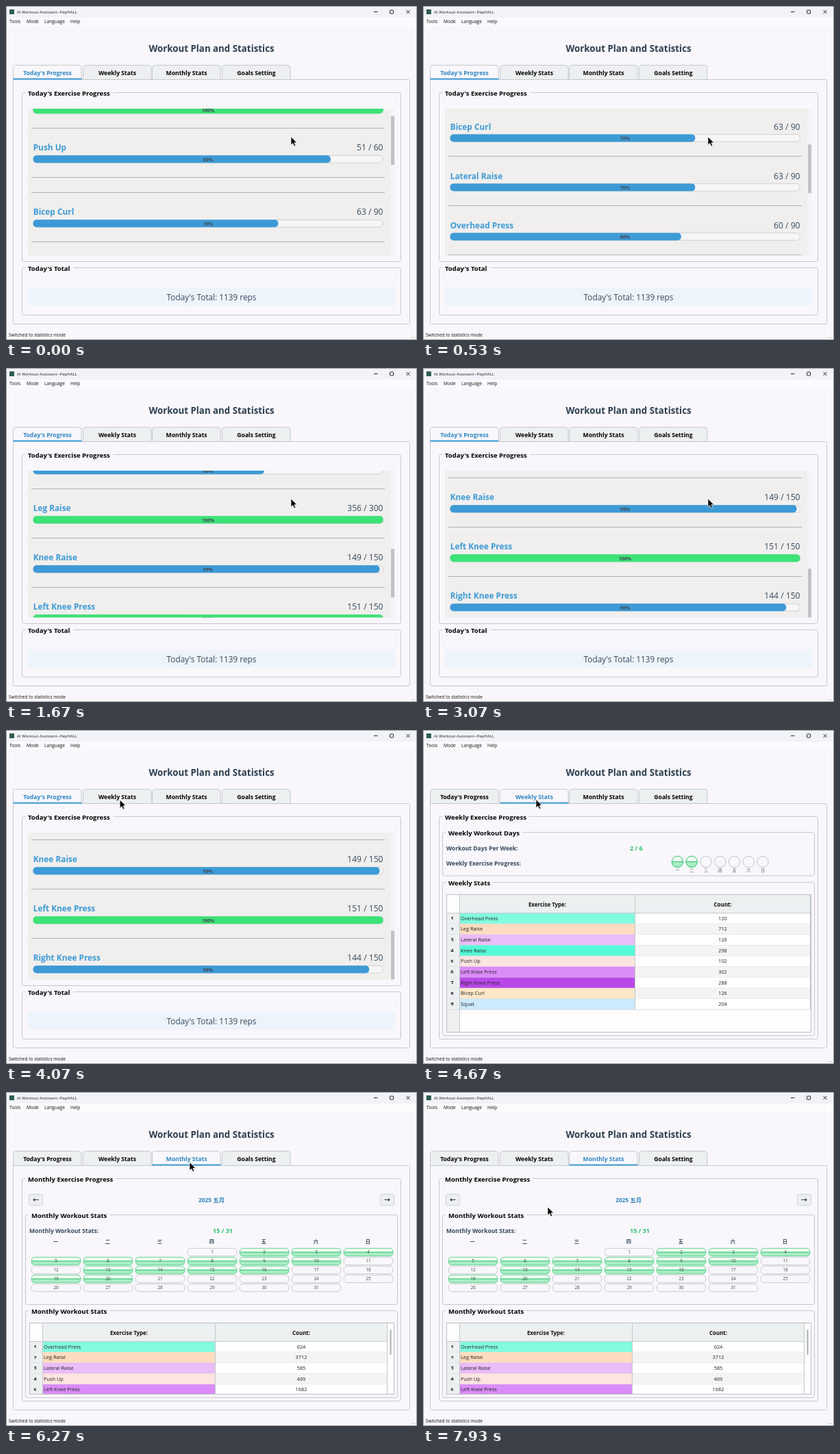
An HTML page that plays this animation: 600x488 px, repeating every 8 s.

```html
<!DOCTYPE html>
<html lang="en">
<head>
<meta charset="utf-8">
<title>Workout statistics</title>
<style>
  html, body { margin: 0; width: 100%; height: 100%; overflow: hidden; background: #f9f7fb; }
  svg { display: block; }
  text { font-family: "Open Sans", "Noto Sans", "Noto Sans CJK SC", "Noto Sans CJK", sans-serif; white-space: pre; }
  .b { font-weight: 700; }
  .mid { text-anchor: middle; }
  .end { text-anchor: end; }
</style>
</head>
<body>
<svg id="stage" width="600" height="488" viewBox="0 0 600 488"></svg>
<script>
const LOOP = 8000, FPS = 15;
const BG = '#f9f7fb', BORDER = '#c6c9cd', PANEL = '#ecf0f1', INK = '#34495e', BLUE = '#3d9ad6', GREEN = '#3de277', OK = '#27c268';

const rect = (x, y, w, h, fill, stroke = 'none', r = 0, extra = '') =>
  `<rect x="${x}" y="${y}" width="${w}" height="${h}" rx="${r}" fill="${fill}" stroke="${stroke}" ${extra}/>`;
const line = (x1, y1, x2, y2, color, w = 1) =>
  `<path d="M${x1} ${y1}L${x2} ${y2}" stroke="${color}" stroke-width="${w}" fill="none"/>`;
const text = (s, x, y, size, cls = '', fill = '#111') =>
  `<text x="${x}" y="${y}" font-size="${size}" class="${cls}" fill="${fill}">${s}</text>`;
const times = (n, fn) => Array.from({ length: n }, (_, i) => fn(i)).join('');

// Titled frame: the label sits on the top border and interrupts it.
const group = (title, x, y, w, h, labelWidth) =>
  rect(x, y, w, h, 'none', BORDER, 3) +
  rect(x + 5, y - 2, labelWidth + 7, 4, BG) +
  text(title, x + 8.5, y + 4, 9.55, 'b', '#000');

// Window chrome
const chrome = () =>
  rect(0, 0, 600, 488, BG) +
  rect(0, 0, 600, 17, '#f1f3f9') +
  rect(0, 17, 600, 12, '#fbfafd') +
  rect(5, 5, 7, 7, '#2f5d50') +
  text('AI Workout Assistant--PepHALL', 16, 11, 6.1, '', '#222') +
  line(537, 8.5, 542.5, 8.5, '#222') +
  rect(560.5, 6, 5, 5, 'none', '#222', 1) +
  line(584.5, 6, 589.5, 11, '#222') + line(589.5, 6, 584.5, 11, '#222') +
  [['Tools', 5], ['Mode', 30], ['Language', 56], ['Help', 94]]
    .map(([s, x]) => text(s, x, 25.3, 6.65)).join('') +
  text('Workout Plan and Statistics', 300, 66.7, 13.3, 'b mid', '#2c3e50') +
  rect(10.5, 107.5, 579, 357, 'none', BORDER, 2) +
  text('Switched to statistics mode', 4, 483, 6.55) +
  times(3, i => rect(596 - 2 * i, 484, 1, 1, '#aaa')) +
  rect(0.5, 0.5, 599, 487, 'none', '#9a9a9e');

// Tabs
const tabs = [["Today's Progress", 10.5], ['Weekly Stats', 112.5], ['Monthly Stats', 213.5], ['Goals Setting', 315.5]];
const tab = ([name, x], active) =>
  `<path d="M${x} 107.5V90.5q0-4 4-4h91.5q4 0 4 4V107.5" fill="${active ? BG : PANEL}" stroke="${BORDER}"/>` +
  (active ? rect(x, 105.6, 100, 2, BLUE) : line(x, 107.5, x + 99.5, 107.5, BORDER)) +
  text(name, x + 50, 100.5, 8.6, 'b mid', active ? '#2f86c5' : '#000');
const tabBar = active => tabs.map((t, i) => tab(t, i === active)).join('');

// Today
const exercises = [
  ['Squat', 102, 100, 100], ['Push Up', 51, 60, 85], ['Bicep Curl', 63, 90, 70],
  ['Lateral Raise', 63, 90, 70], ['Overhead Press', 60, 90, 66], ['Leg Raise', 356, 300, 100],
  ['Knee Raise', 149, 150, 99], ['Left Knee Press', 151, 150, 100], ['Right Knee Press', 144, 150, 96]
];
const separator = y => line(37, y, 553, y, '#b0b0b0');
function exercise([name, done, goal, pct], i) {
  const y = 135 + 72 * i + (i > 1 ? 22 : 0);
  return text(name, 39.7, y + 4.4, 11.85, 'b', BLUE) +
    text(`${done} / ${goal}`, 550.5, y + 4.4, 12.1, 'end', INK) +
    rect(39.8, y + 11.5, 510.6, 10.6, '#f7f5f7', '#c3c7ca', 5, 'stroke-width=".8"') +
    rect(39.6, y + 11.2, 511 * pct / 100, 11, pct === 100 ? GREEN : BLUE, 'none', 5) +
    text(pct + '%', 295, y + 19.5, 7.1, 'b mid', '#3f4a52') +
    separator(y + 43.5);
}
const todayView = () =>
  group("Today's Exercise Progress", 23.5, 126.5, 553, 247, 121) +
  rect(32, 150, 536, 214.5, '#f4f3f5') + rect(32, 150, 529, 214.5, '#f0efee') +
  `<svg x="32" y="150" width="529" height="214.5" viewBox="32 150 529 214.5"><g id="list">` +
  exercises.map(exercise).join('') + separator(272.5) + '</g></svg>' +
  rect(562, 150, 5, 71, '#c0c1c4', 'none', 0, 'id="thumb"') +
  group("Today's Total", 23.5, 382.5, 553, 69, 63) +
  rect(32, 411, 536, 27, '#eef4fb', 'none', 2) +
  text("Today's Total: 1139 reps", 300, 430, 11.8, 'mid', INK);

// Tables
const rowColor = {
  'Overhead Press': '#82fbdf', 'Leg Raise': '#ffdcc0', 'Lateral Raise': '#eabcfa', 'Knee Raise': '#55fbd8',
  'Push Up': '#fce4e0', 'Left Knee Press': '#da8cf8', 'Right Knee Press': '#b948e8',
  'Bicep Curl': '#fee8c8', 'Squat': '#cce9fd'
};
function table(top, split, right, rows) {
  const head = top + 27, step = 15.67, height = 441.5 - top, mid = (split + right) / 2;
  const body = rows.map(([name, count], i) => {
    const y = head + i * step, base = y + 10.5;
    return rect(53.5, y, split - 53.5, step, rowColor[name]) +
      rect(split, y, right - split, step, i % 2 ? '#f5f4f3' : '#fff') +
      rect(35, y, 18.5, step, PANEL) +
      line(35, y + step, right, y + step, '#d3d6d8', .8) +
      text(i + 1, 42.5, base, 7.2, 'b mid') + rect(39, base - 1, 8, 2, PANEL) +
      text(name, 55, base - .2, 7.4, '', '#222') +
      text(count, mid, base - .2, 7.4, 'mid', '#222');
  }).join('');
  return `<svg x="34" y="${top - .5}" width="533" height="${height + 1}" viewBox="34 ${top - .5} 533 ${height + 1}">` +
    rect(34.5, top, 532, height, '#fffefe') +
    rect(35, head, 18.5, height, '#f0efef') +
    rect(53.5, top, right - 53.5, 27, PANEL) + body +
    line(35, head, right, head, '#c3c8ca') +
    [53.5, split, right].map(x => line(x, top, x, x === 53.5 ? 441 : head + rows.length * step, '#c3c8ca')).join('') +
    text('Exercise Type:', (53.5 + split) / 2, top + 17, 7.95, 'b mid') +
    text('Count:', mid, top + 17, 7.95, 'b mid') +
    rect(34.5, top, 532, height, 'none', '#b9bec1') + '</svg>';
}

// Weekly
const days = [...'一二三四五六日'];
const dayDot = i => {
  const x = 371.5 + 20.75 * i, done = i < 2;
  return `<circle cx="${x}" cy="192.5" r="8.2" fill="${done ? '#f0faf4' : BG}"/>` +
    (done ? `<path d="M${x - 8.2} 192.5a8.2 8.2 0 0 0 16.4 0z" fill="#a9edc4"/>` + line(x - 8, 192.5, x + 8, 192.5, OK) : '') +
    `<circle cx="${x}" cy="192.5" r="8.2" fill="none" stroke="${done ? OK : '#bcc3c6'}"/>` +
    text(days[i], x, 207.2, 5.6, 'mid', '#444');
};
const weeklyView = () =>
  group('Weekly Exercise Progress', 23.5, 126.5, 553, 325, 119) +
  group('Weekly Workout Days', 28.5, 149.5, 543, 63.5, 104) +
  text('Workout Days Per Week:', 34, 176.2, 8.55, 'b', INK) +
  text('2 / 6', 302, 176.2, 9, 'b', OK) +
  text('Weekly Exercise Progress:', 34, 198.2, 8.55, 'b', INK) +
  times(7, dayDot) +
  group('Weekly Stats', 28.5, 222.5, 543, 224, 61) +
  table(240.5, 309.5, 565.5, [['Overhead Press', 120], ['Leg Raise', 712], ['Lateral Raise', 126],
    ['Knee Raise', 298], ['Push Up', 102], ['Left Knee Press', 302], ['Right Knee Press', 288],
    ['Bicep Curl', 126], ['Squat', 204]]);

// Monthly
const trained = d => (d > 1 && d < 11) || (d > 12 && d < 17) || d === 19 || d === 20;
const dayCell = i => {
  const d = i + 1, slot = i + 3, done = trained(d);
  const x = 37.3 + 76 * (slot % 7), y = 228.4 + 13 * Math.floor(slot / 7);
  return rect(x, y, 71.5, 11.2, done ? '#effaf3' : BG, 'none', 4.5) +
    (done ? `<path d="M${x} ${y + 5.6}h71.5v2q0 3.6-4 3.6h-63.5q-4 0-4-3.6z" fill="#a9edc4"/>` +
      line(x, y + 5.6, x + 71.5, y + 5.6, OK) : '') +
    rect(x, y, 71.5, 11.2, 'none', done ? '#55cf88' : '#c6c8ca', 4.5, 'stroke-width=".9"') +
    text(d, x + 35.7, y + 8, 6.3, 'mid', '#444');
};
const navButton = (x, arrow) =>
  rect(x, 149.5, 20, 16, PANEL, '#cdd2d5', 3) + text(arrow, x + 10, 160.6, 9, 'b mid', '#222');
const monthlyView = () =>
  group('Monthly Exercise Progress', 23.5, 126.5, 553, 325, 125) +
  navButton(33.5, '←') + navButton(546.5, '→') +
  text('2025 五月', 300, 160.5, 8.4, 'b mid', '#2f83c0') +
  group('Monthly Workout Stats', 28.5, 179.5, 543, 131, 111) +
  text('Monthly Workout Stats:', 34, 206.2, 8.55, 'b', INK) +
  text('15 / 31', 302, 206.2, 9, 'b', OK) +
  times(7, i => text(days[i], 72.3 + 76 * i, 221.3, 7.2, 'b mid', INK)) +
  times(31, dayCell) +
  group('Monthly Workout Stats', 28.5, 319.5, 543, 127, 111) +
  table(337.5, 305.5, 556.5, [['Overhead Press', 624], ['Leg Raise', 3712], ['Lateral Raise', 585],
    ['Push Up', 469], ['Left Knee Press', 1682]]) +
  rect(560.5, 347, 2, 37, '#a9abad', 'none', 1);

const views = [todayView, weeklyView, monthlyView];
const stage = document.getElementById('stage');
stage.innerHTML = chrome() +
  views.map((view, i) => `<g class="view">${tabBar(i)}${view()}</g>`).join('') +
  '<path id="cursor" d="M0 0V12.2L2.8 9.6L4.8 14L6.8 13.1L4.9 8.8H8.7Z" fill="#000" stroke="#fff" stroke-width=".7"/>';

// Motion
const NOTCH = 31.2, MAX_SCROLL = 400;
const wheel = [67, 200, 333, 467, 867, 1000, 1133, 1267, 1400, 1600, 1800, 1933, 2067];
const tabClicks = [0, 4200, 5800];
const path = [[0, 416, 191], [3300, 416, 191], [4100, 165, 101.5], [5200, 165, 101.5],
  [5700, 268, 102.5], [6900, 268, 102.5], [7800, 182, 168]];

const countPassed = (list, t) => list.filter(at => at <= t).length;
const ease = p => p * p * (3 - 2 * p);
function cursorAt(t) {
  const i = path.findIndex(p => p[0] > t);
  if (i < 0) return path[path.length - 1].slice(1);
  const [t0, x0, y0] = path[i - 1], [t1, x1, y1] = path[i];
  const k = ease((t - t0) / (t1 - t0));
  return [x0 + (x1 - x0) * k, y0 + (y1 - y0) * k];
}

const viewNodes = [...stage.querySelectorAll('.view')];
const list = document.getElementById('list');
const thumb = document.getElementById('thumb');
const cursor = document.getElementById('cursor');

function draw() {
  const now = performance.now() % LOOP;
  const t = Math.floor(now * FPS / 1000 + .06) * 1000 / FPS + 1;
  const scroll = Math.min(MAX_SCROLL, NOTCH * countPassed(wheel, t));
  const active = countPassed(tabClicks, t) - 1;
  list.setAttribute('transform', `translate(0 ${-scroll})`);
  thumb.setAttribute('y', 161 + scroll * .331);
  viewNodes.forEach((node, i) => node.style.display = i === active ? '' : 'none');
  cursor.setAttribute('transform', `translate(${cursorAt(t)})`);
  requestAnimationFrame(draw);
}
draw();
</script>
</body>
</html>
```
